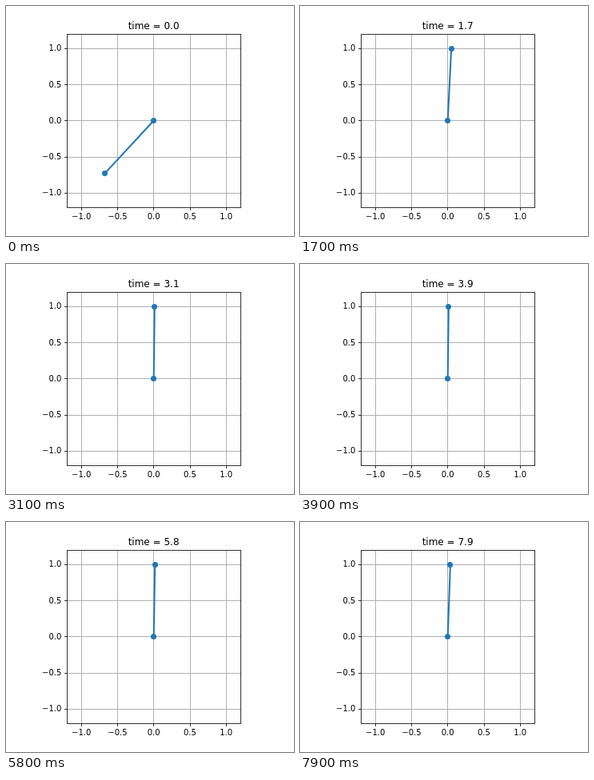
These frames come from a looping animation (360x288 px, 8 s). An HTML page:

```html
<!DOCTYPE html>
<html lang="en">
<head>
<meta charset="utf-8">
<title>Pendulum swing-up</title>
<style>
  html, body { margin: 0; width: 100%; height: 100%; overflow: hidden; background: #fefefe; }
  svg { display: block; width: 360px; height: 288px; }
  text { font: 10px "DejaVu Sans", sans-serif; fill: #000; }
  #title { font-size: 12px; }
  .grid { stroke: #b0b0b0; stroke-width: 1; }
  .axis { stroke: #000; stroke-width: 1; fill: none; stroke-opacity: .8; }
  #rod { stroke: #1f77b4; stroke-width: 2; stroke-linecap: square; }
  circle { fill: #1f77b4; }
</style>
</head>
<body>
<svg viewBox="0 0 360 288">
  <g id="plot"></g>
  <line id="rod"/>
  <circle id="pivot" r="3.5"/>
  <circle id="bob" r="3.5"/>
  <text id="title" x="184.6" y="29" text-anchor="middle"></text>
</svg>
<script>
const $ = id => document.getElementById(id);
const LEFT = 76.5, TOP = 35.5, SIZE = 217;
const CX = 184.7, CY = 143.5, UNIT = 90.45;
const LOOP = 8000, STEP = 100;

function add(tag, attrs, text = '') {
  const el = document.createElementNS('http://www.w3.org/2000/svg', tag);
  for (const k in attrs) el.setAttribute(k, attrs[k]);
  el.textContent = text;
  $('plot').append(el);
}
const line = (cls, x1, y1, x2, y2) => add('line', { class: cls, x1, y1, x2, y2 });

function drawAxes() {
  const right = LEFT + SIZE, bottom = TOP + SIZE;
  const ticks = [18, 63, 108, 154, 199];
  for (const d of ticks) {
    line('grid', LEFT + d, TOP, LEFT + d, bottom);
    line('grid', LEFT, TOP + d, right, TOP + d);
  }
  ticks.forEach((d, i) => {
    const v = (i - 2) / 2, x = LEFT + d, y = TOP + d;
    const label = n => n.toFixed(1).replace('-', '\u2212');
    line('axis', x, bottom, x, bottom + 3.5);
    line('axis', LEFT - 3.5, y, LEFT, y);
    add('text', { x: CX + v * UNIT, y: 267, 'text-anchor': 'middle' }, label(v));
    add('text', { x: 69.3, y: Math.round(CY - v * UNIT + 3.4), 'text-anchor': 'end' }, label(-0 + v));
  });
  add('rect', { class: 'axis', x: LEFT, y: TOP, width: SIZE, height: SIZE });
}

// Angles are clockwise from upright, in radians.
const START = 3.889, CATCH = 0.9;

// Swing from rest under gravity and a constant torque.
function swing(torque, time) {
  const dt = 0.002;
  let a = START, v = 0;
  for (let i = Math.round(time / dt); i > 0; i--) {
    v += (9.8 * Math.sin(a) - torque) * dt;
    a += v * dt;
  }
  return a;
}

// Damped approach to upright, followed by a slow drift.
function settle(t) {
  const s = t - CATCH;
  return 0.96 * Math.exp(-3.65 * s) - 0.12 * Math.exp(-2.7 * s)
    + 0.011 + 0.0028 * Math.exp(0.7 * (t - 4.8));
}

function findTorque() {
  let lo = 5, hi = 9;
  for (let i = 0; i < 30; i++) {
    const mid = (lo + hi) / 2;
    if (swing(mid, CATCH) > settle(CATCH)) lo = mid; else hi = mid;
  }
  return lo;
}

const torque = findTorque();
const angle = t => t < CATCH ? swing(torque, t) : settle(t);
const snap = v => Math.floor(v) + 0.5;

function place(el, x, y) {
  el.setAttribute('cx', snap(x));
  el.setAttribute('cy', snap(y));
}

let shown = -1;
function render(now) {
  const step = Math.floor((now % LOOP) / STEP);
  if (step !== shown) {
    shown = step;
    const t = step / 10, a = angle(t);
    const x = CX + UNIT * Math.sin(a), y = CY - UNIT * Math.cos(a);
    $('rod').setAttribute('x2', x);
    $('rod').setAttribute('y2', y);
    place($('bob'), x, y);
    $('title').textContent = 'time = ' + t.toFixed(1);
  }
}

drawAxes();
$('rod').setAttribute('x1', CX);
$('rod').setAttribute('y1', CY);
place($('pivot'), CX, CY);

const begin = performance.now();
function tick() {
  render(performance.now() - begin);
  requestAnimationFrame(tick);
}
tick();
</script>
</body>
</html>
```
